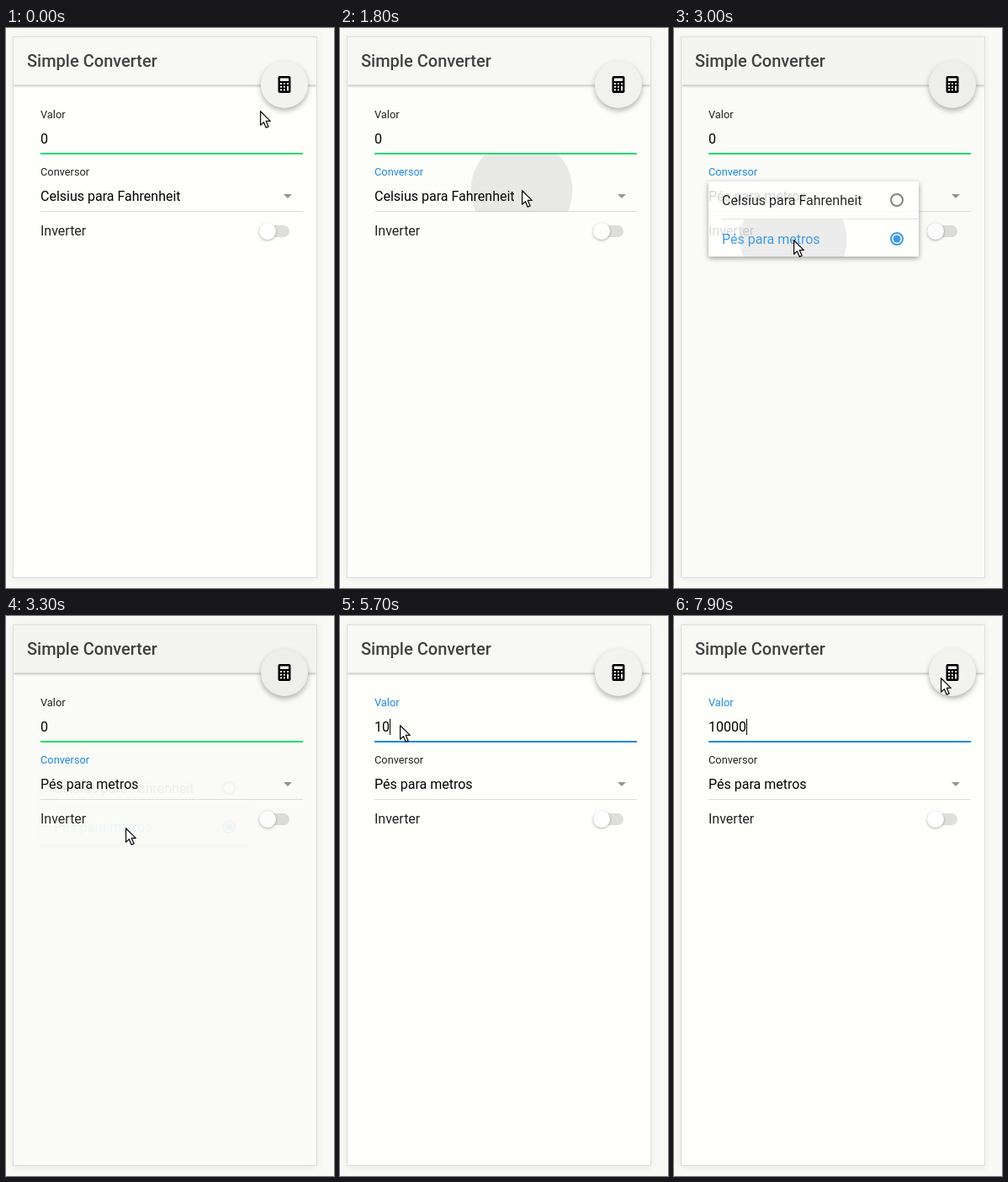
Animation, 390 px wide and 664 px high, one loop 8 s. Source, as an HTML page:

```html
<!DOCTYPE html>
<html lang="pt">
<head>
<meta charset="utf-8">
<title>Simple Converter</title>
<style>
  html, body { margin: 0; width: 100%; height: 100%; overflow: hidden; background: #f9f9f6; }
  svg { display: block; width: 390px; height: 664px; font: 16px Roboto, sans-serif; }
  .label { font-size: 12.8px; fill: #222; }
  .title { font-size: 20px; font-weight: 500; fill: #424242; }
  .card { filter: drop-shadow(0 1px 5px rgba(0,0,0,.07)); }
  .bar { filter: drop-shadow(0 1px 1.5px rgba(0,0,0,.32)); }
  .fab { filter: drop-shadow(0 3px 3px rgba(0,0,0,.3)); }
  .knob { filter: drop-shadow(0 1px 1.5px rgba(0,0,0,.32)); }
  .sheet { filter: drop-shadow(0 2px 3px rgba(0,0,0,.45)); }
</style>
</head>
<body>
<svg viewBox="0 0 390 664">
  <defs>
    <clipPath id="page"><rect x="9" y="11" width="360" height="640"/></clipPath>
    <clipPath id="selectRow"><rect x="9" y="150" width="360" height="68"/></clipPath>
    <clipPath id="optionRow"><rect x="41" y="227" width="250" height="44"/></clipPath>
  </defs>

  <rect class="card" x="8.5" y="10.5" width="361" height="641" fill="#fefffb" stroke="#deded9"/>
  <g clip-path="url(#page)">
    <rect class="bar" x="9" y="11" width="360" height="56.5" fill="#f8f8f5"/>
  </g>
  <text class="title" x="25" y="46">Simple Converter</text>

  <text class="label" id="valueLabel" x="41" y="107">Valor</text>
  <text id="value" x="41" y="137">0</text>
  <rect id="caret" y="122" width="1" height="19"/>
  <rect id="underline" x="41" y="148" width="312" height="2"/>

  <text class="label" id="selectLabel" x="41" y="175">Conversor</text>
  <text id="choice" x="41" y="205"></text>
  <path d="M330 197h10l-5 5z" fill="#959592"/>
  <rect x="41" y="217" width="312" height="1" fill="#dededa"/>
  <g clip-path="url(#selectRow)"><circle id="selectRipple" cx="216" cy="192" fill="#555"/></g>

  <text x="41" y="246" fill="#222">Inverter</text>
  <rect x="301" y="234" width="36" height="14" rx="7" fill="#dededa"/>
  <circle class="knob" cx="311" cy="241" r="10" fill="#fff"/>

  <circle class="fab" cx="331" cy="67" r="28" fill="#f2f2ef"/>
  <rect x="323.5" y="57" width="15" height="20" rx="2"/>
  <g id="keys" fill="#f2f2ef"><rect x="326" y="59.5" width="10" height="3.5"/></g>

  <rect id="shade" x="9" y="11" width="360" height="640"/>

  <g id="popover">
    <rect class="sheet" x="41" y="182" width="250" height="89" rx="1" fill="#fff"/>
    <rect x="57" y="226" width="234" height="1" fill="#dededc"/>
    <g clip-path="url(#optionRow)"><circle id="optionRipple" cx="142" cy="251" fill="#555"/></g>
    <g id="options"></g>
  </g>

  <path id="cursor" d="M.6.8V17.2L4.4 13.6 7.2 20.2 10.1 18.9 7.3 12.4H12.3Z"
        fill="#fff" stroke="#111" stroke-width="1.3" stroke-linejoin="round"/>
</svg>
<script>
const LOOP = 8000, STEP = 100;
const BLUE = '#1f88e3', GREEN = '#1fe070', INK = '#222';
const CHOICES = ['Celsius para Fahrenheit', 'Pés para metros'];

const $ = id => document.getElementById(id);
const set = (node, attrs) => {
  for (const name in attrs) node.setAttribute(name, attrs[name]);
  return node;
};
const add = (parent, tag, attrs) =>
  parent.appendChild(set(document.createElementNS('http://www.w3.org/2000/svg', tag), attrs));

const clamp = x => Math.min(1, Math.max(0, x));
const progress = (t, start, end) => clamp((t - start) / (end - start));
const mix = (a, b, k) => a + (b - a) * k;
const smooth = k => k * k * (3 - 2 * k);

// CSS-style cubic-bezier easing, solved by bisection
function bezier(x1, y1, x2, y2) {
  const at = (a, b, u) => 3 * a * u * (1 - u) ** 2 + 3 * b * u * u * (1 - u) + u ** 3;
  return x => {
    if (x <= 0 || x >= 1) return clamp(x);
    let lo = 0, hi = 1;
    for (let i = 0; i < 24; i++) {
      const mid = (lo + hi) / 2;
      if (at(x1, x2, mid) < x) lo = mid; else hi = mid;
    }
    return at(y1, y2, lo);
  };
}
const ease = bezier(.25, .1, .25, 1);
const pop = bezier(.36, .66, .04, 1);

// Calculator keys: three by three, with one tall key at the lower right
for (let i = 0; i < 8; i++) {
  add($('keys'), 'rect', {
    x: 326 + i % 3 * 4, y: 65 + Math.floor(i / 3) * 3.7,
    width: 2, height: i === 5 ? 5.7 : 2
  });
}

const options = CHOICES.map((label, i) => {
  const y = 204 + 46 * i;
  const text = add($('options'), 'text', { x: 57, y: y + 5.5 });
  text.textContent = label;
  return {
    text,
    ring: add($('options'), 'circle', { cx: 265, cy: y, r: 7, fill: 'none', 'stroke-width': 2 }),
    dot: add($('options'), 'circle', { cx: 265, cy: y, r: 4.5, fill: BLUE })
  };
});

// Pointer path: start, end, destination
const MOVES = [
  [500, 900, 107, 130],
  [1000, 1200, 149, 177],
  [1200, 1400, 216, 192],
  [2000, 2500, 144, 244],
  [2500, 2600, 142, 251],
  [3300, 3700, 72, 130],
  [3700, 3800, 71, 129],
  [7300, 7900, 317, 73]
];
// Typed text by time
const TYPING = [[0, '0'], [5000, ''], [5400, '1'], [5700, '10'], [6200, '100'], [6400, '1000'], [6600, '10000']];
const CARET_ON = [[4000, 4500], [5000, 5400], [5500, 7100], [7600, LOOP]];

function pointer(t) {
  let x = 302, y = 98;
  for (const [start, end, toX, toY] of MOVES) {
    const k = smooth(progress(t, start, end));
    x = mix(x, toX, k);
    y = mix(y, toY, k);
  }
  return [x, y];
}

function ripple(node, t, start, duration, radius) {
  const k = progress(t, start, start + duration);
  set(node, { r: radius * ease(k), opacity: k > 0 ? .18 * (1 - k) : 0 });
}

function draw(t) {
  const focused = t >= 4000;
  const picked = t >= 2900 ? 1 : 0;

  const text = TYPING.filter(([start]) => t >= start).pop()[1];
  $('value').textContent = text;
  set($('caret'), {
    x: 41 + text.length * 9,
    opacity: CARET_ON.some(([on, off]) => t >= on && t < off) ? 1 : 0
  });
  set($('valueLabel'), { style: `fill:${focused ? BLUE : INK}` });
  set($('underline'), { fill: focused ? BLUE : GREEN });

  $('choice').textContent = CHOICES[picked];
  set($('selectLabel'), { style: `fill:${t >= 1800 && t < 3450 ? BLUE : INK}` });
  ripple($('selectRipple'), t, 1650, 450, 105);
  ripple($('optionRipple'), t, 2850, 450, 110);

  const enter = pop(progress(t, 1780, 2080));
  const stay = 1 - ease(progress(t, 2930, 3430));
  set($('popover'), {
    opacity: enter * stay,
    transform: `translate(41 182) scale(${Math.max(.001, enter)}) translate(-41 -182)`
  });
  set($('shade'), { opacity: .015 * enter * (1 - progress(t, 3300, 3500)) });
  options.forEach(({ text, ring, dot }, i) => {
    const on = i === picked;
    set(text, { fill: on ? BLUE : '#000' });
    set(ring, { stroke: on ? BLUE : '#6d6d6d' });
    set(dot, { opacity: on ? 1 : 0 });
  });

  set($('cursor'), { transform: `translate(${pointer(t)})` });
}

const begin = performance.now();
function tick() {
  const t = (performance.now() - begin) % LOOP;
  draw(Math.floor(t / STEP) * STEP);
  requestAnimationFrame(tick);
}
tick();
</script>
</body>
</html>
```
